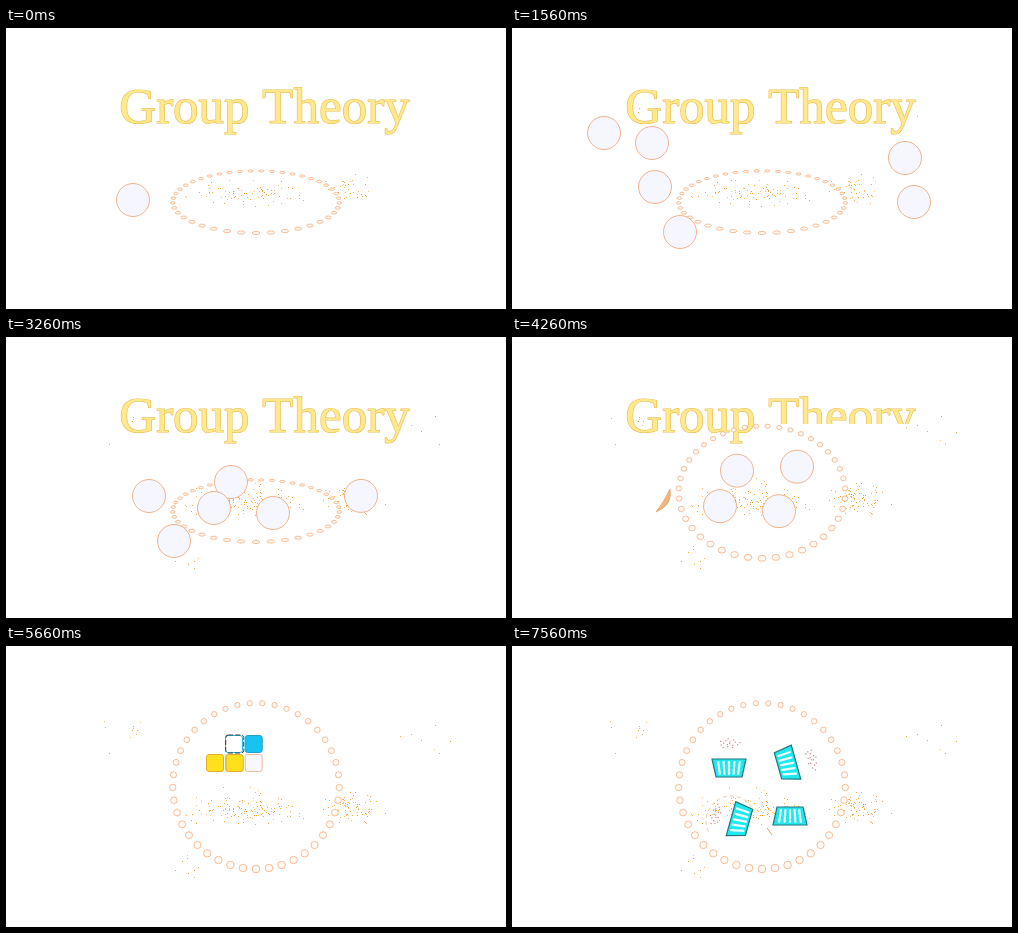
Recreate the animation shown at these times as an HTML page with a canvas. Size 500 by 281 pixels, loop 8.06 s.

```html
<!DOCTYPE html>
<html lang="en">
<head>
<meta charset="utf-8">
<title>Group Theory</title>
<style>
html, body { margin: 0; width: 100%; height: 100%; overflow: hidden; background: #fff; }
canvas { display: block; }
</style>
</head>
<body>
<canvas id="stage" width="500" height="281"></canvas>
<script>
const c = document.getElementById('stage').getContext('2d');
const LOOP = 8060, TAU = Math.PI * 2, QUARTER = Math.PI / 2;
const mix = (a, b, k) => a + (b - a) * k;
const ramp = (t, a, b) => Math.min(1, Math.max(0, (t - a) / (b - a)));
const ease = (t, a, b) => { const k = ramp(t, a, b); return k * k * (3 - 2 * k); };

// The picture holds, then advances in 80 ms and later 100 ms steps.
function step(t) {
  if (t < 500) return 0;
  if (t < 1560) return 500 + Math.floor((t - 500) / 80) * 80;
  return Math.min(7560, 1560 + Math.floor((t - 1560) / 100) * 100);
}

function paint(fill, stroke, width = 0.7) {
  if (fill) { c.fillStyle = fill; c.fill(); }
  if (stroke) { c.strokeStyle = stroke; c.lineWidth = width; c.stroke(); }
}

function oval(x, y, rx, ry, fill, stroke) {
  c.beginPath();
  c.ellipse(x, y, rx, ry, 0, 0, TAU);
  paint(fill, stroke);
}

function line(x1, y1, x2, y2, stroke, width) {
  c.beginPath();
  c.moveTo(x1, y1);
  c.lineTo(x2, y2);
  paint(null, stroke, width);
}

// ---- specks: clouds that thicken between two times ------------------------
let seed = 7;
const rnd = () => (seed = seed * 16807 % 2147483647) / 2147483647;
const bell = () => rnd() + rnd() + rnd() - 1.5;
const specks = [];
function scatter(n, x, y, w, h, from = 0, to = from) {
  while (n--) specks.push({ x: x + bell() * w, y: y + bell() * h, born: mix(from, to, rnd()), alpha: mix(0.55, 1, rnd()) });
}
scatter(75, 240, 165, 46, 11);
scatter(35, 346, 160, 22, 11);
scatter(55, 235, 160, 50, 18, 900, 3200);
scatter(45, 346, 161, 28, 15, 900, 3200);
scatter(10, 112, 84, 38, 18, 900, 5000);
scatter(7, 424, 96, 24, 18, 900, 4000);
scatter(8, 180, 218, 26, 18, 1000, 2800);

function drawSpecks(t) {
  c.fillStyle = '#f59a1c';
  for (const s of specks) {
    if (t < s.born) continue;
    c.globalAlpha = s.alpha;
    c.fillRect(Math.round(s.x), Math.round(s.y), 1, 1);
  }
  c.globalAlpha = 1;
}

// ---- title, wiped upwards, its right part first ----------------------------
function drawTitle(t) {
  if (t >= 4560) return;
  c.save();
  c.beginPath();
  c.rect(0, 0, 246, mix(108, 52, ramp(t, 4260, 4540)));
  c.rect(246, 0, 254, mix(112, 52, ramp(t, 4060, 4540)));
  c.clip();
  c.font = '51px "Liberation Serif", "Times New Roman", serif';
  c.lineJoin = 'round';
  c.strokeStyle = '#eab94e';
  c.lineWidth = 1.2;
  c.strokeText('Group Theory', 113.3, 94.5);
  c.fillStyle = '#ffe98c';
  c.fillText('Group Theory', 113.3, 94.5);
  c.restore();
}

// ---- ring of beads, tilting up to face the viewer --------------------------
const lift = t => ease(t, 3960, 4600);

function drawRing(t) {
  const up = lift(t), flat = Math.sin(mix(22, 90, up) * Math.PI / 180);
  const ry = 83 * flat, cy = mix(205, 223, Math.min(1, up * 2)) - ry;
  const skew = mix(0.16, 0.02, up);
  for (let i = 0; i < 41; i++) {
    const turn = i / 41 * TAU, a = turn + skew * Math.sin(turn);
    const size = 3.2 + 0.6 * Math.cos(a);
    const wide = size * mix(0.6 + 0.4 * Math.abs(Math.cos(a)), 1, flat * flat);
    oval(250 + 83.3 * Math.sin(a), cy + ry * Math.cos(a),
      wide, size * Math.max(0.42, flat), '#fffaf6', '#f2a36c');
  }
}

// ---- balls: roll in from the nearer edge, rest, then swing to a second spot --
const balls = [
  { arrive: 0, from: [127, 172], leave: 500, to: [143, 159] },
  { arrive: 1460, from: [168, 204], leave: 1560, to: [168, 204] },
  { arrive: 1560, from: [140, 115], leave: 1560, to: [225, 145] },
  { arrive: 1560, from: [92, 105], leave: 1860, to: [208, 171] },
  { arrive: 1560, from: [402, 174], leave: 2160, to: [267, 176] },
  { arrive: 1560, from: [393, 130], leave: 2860, to: [285, 141] }
];

function drawBalls(t) {
  balls.forEach(({ arrive, from: [x1, y1], leave, to: [x2, y2] }, i) => {
    const enter = ease(t, arrive - 900, arrive), k = ease(t, leave, leave + 1000);
    const swing = x1 === x2 ? 0 : 28 * Math.sin(Math.PI * k);
    const x = mix(mix(x1 < 250 ? -20 : 520, x1, enter), x2, k);
    const y = mix(y1, y2, k) + swing - lift(t) * (y2 < 160 ? 25 : 4);
    const fade = i < 2 ? ramp(t, 3760, 4160) : ramp(t, 4660, 4960);
    if (fade < 1) oval(x, y, 16.5 * (1 - fade), 16.5 * (1 - fade), '#f5f6fe', '#e8965c');
  });
  if (t >= 4060 && t < 4560) {
    c.beginPath();
    c.moveTo(158, 152);
    c.quadraticCurveTo(161, 168, 144, 175);
    c.quadraticCurveTo(152, 165, 158, 152);
    paint('#f3b580', '#e59a58');
  }
}

// ---- tiles: each copy slides to the next corner, then makes a quarter turn ---
const corner = i => {
  const a = (i - 0.5) * QUARTER;
  return [247 + 19 * Math.SQRT2 * Math.sin(a), 139 - 22 * Math.SQRT2 * Math.cos(a)];
};

function tile(x, y, size, fill, stroke) {
  c.beginPath();
  c.roundRect(x - size / 2, y - size / 2, size, size, 2.5);
  paint(fill, stroke, 1);
}

function trio(x, y, turn, { hollow = false, framed = false, grow = 1 } = {}) {
  const dx = 19 * Math.sin(turn * QUARTER), dy = -19 * Math.cos(turn * QUARTER), size = 17 * grow;
  if (framed) {
    c.setLineDash([5, 2]);
    tile(x + dx + dy, y + dy - dx, 18, null, '#4a3428');
    c.setLineDash([]);
  }
  tile(x + dx, y + dy, size, hollow ? '#fff' : '#16c3f3', hollow ? '#16c3f3' : '#2c9cc0');
  tile(x, y, size, '#f7f7fd', '#eabb9c');
  tile(x + dy, y - dx, size, '#ffe01c', '#e2ad28');
}

function drawTiles(t) {
  if (t < 4960) return;
  for (let i = 0; i < 4; i++) {
    const start = 5010 + 450 * i, end = start + 450;
    if (t >= 7060 + i * 100 || (i && t < start)) continue;
    const [x, y] = corner(i);
    if (i && t < end) {
      const [px, py] = corner(i - 1), k = ease(t, start, start + 390);
      trio(mix(px, x, k), mix(py, y, k), i - 1 + ease(t, start + 300, end), { framed: k > 0 && k < 1 });
    } else {
      trio(x, y, i, { hollow: i < 3 && t > end && t < end + 390, grow: i ? 1 : mix(0.5, 1, ramp(t, 4860, 5060)) });
    }
  }
}

// ---- ribbed blocks: one trapezoid in four quarter turns, sheared sideways ------
const centres = [[217, 122], [275, 118], [278, 170], [228, 174.5]];

function drawBlock([x, y], i, grow) {
  const shear = Math.sin(i * QUARTER);
  c.save();
  c.translate(x, y);
  c.transform(grow, -0.2 * shear, 0.28 * shear, grow, 0, 0);
  c.rotate(i * QUARTER);
  c.beginPath();
  c.moveTo(-17, -9);
  c.lineTo(17, -9);
  c.lineTo(13, 9);
  c.lineTo(-13, 9);
  c.closePath();
  paint('#1fe9ee', '#23777c', 1.2);
  c.lineCap = 'round';
  for (let j = -2; j <= 2; j++) line(j * 5.4, -6, j * 4.6, 6, '#e9ffff', 2.2);
  if (i !== 2) {
    c.fillStyle = '#d9868c';
    for (let j = 0; j < 16; j++) {
      const a = j * 2.4, r = Math.sqrt(j / 16);
      c.fillRect(12 * r * Math.cos(a), 5 * r * Math.sin(a) - 25, 1.2, 1.2);
    }
  }
  c.restore();
}

function drawBlocks(t) {
  centres.forEach((centre, i) => {
    const born = 7060 + i * 100;
    if (t >= born) drawBlock(centre, i, ramp(t, born - 100, born + 200));
  });
  if (t < 7360) return;
  c.setLineDash([4, 3]);
  c.beginPath();
  c.arc(219, 175, 25, 2.7, 5.7);
  paint(null, '#f0b77c');
  c.setLineDash([]);
  line(255, 182, 260, 189, '#f0a04c', 1);
}

function draw(now) {
  const t = step(now % LOOP);
  c.clearRect(0, 0, 500, 281);
  for (const layer of [drawSpecks, drawTitle, drawRing, drawBalls, drawTiles, drawBlocks]) layer(t);
}

let begin;
function tick(now) {
  begin ??= now;
  draw(now - begin);
  requestAnimationFrame(tick);
}
draw(0);
requestAnimationFrame(tick);
</script>
</body>
</html>
```
